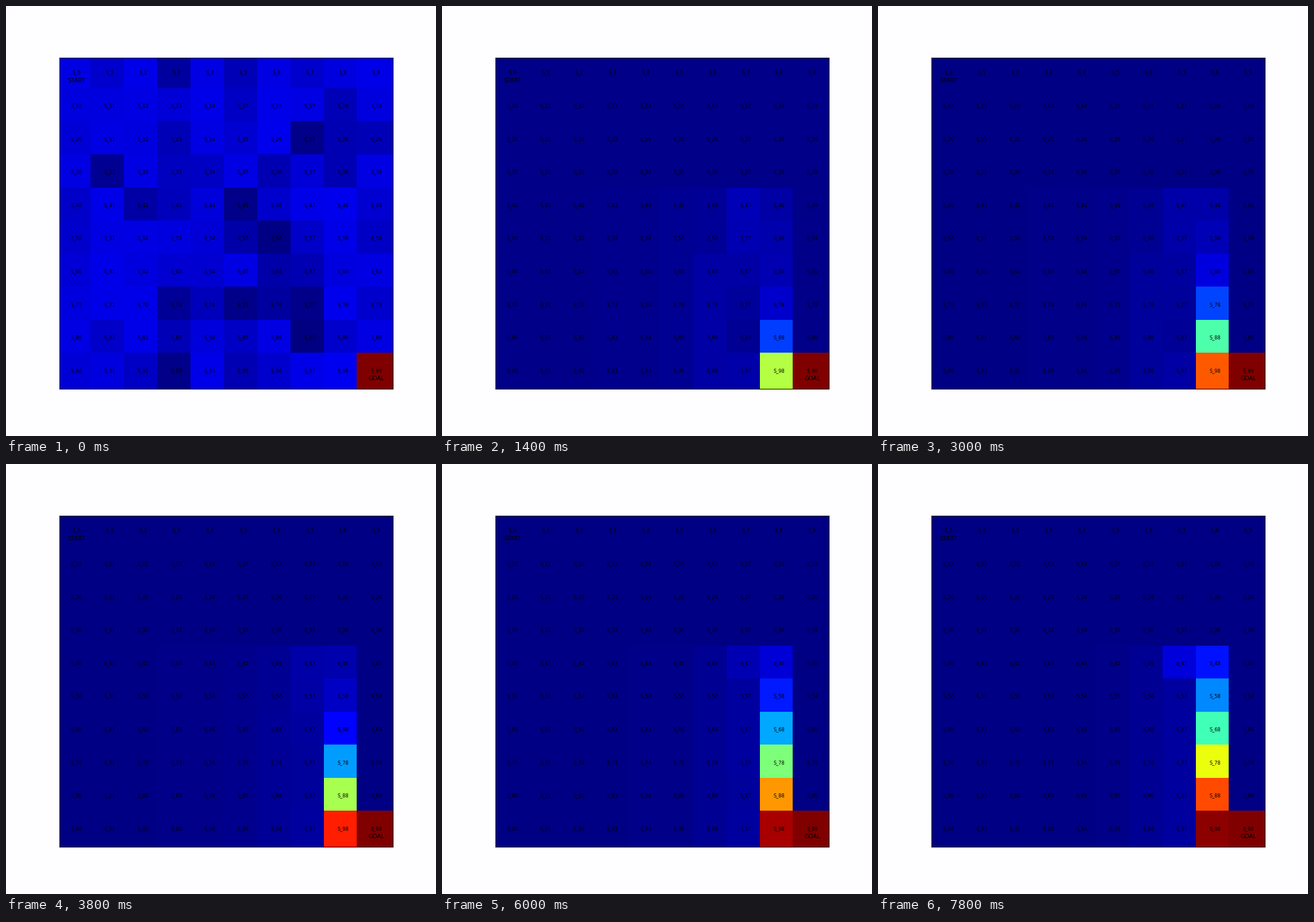
These frames come from a looping animation (748x748 px, 8 s). A matplotlib script:

```python
import numpy as np
import matplotlib.pyplot as plt
from matplotlib.animation import FuncAnimation

SIZE, DPI = 748, 100
STEPS, INTERVAL = 40, 200
N = 10
ALPHA, GAMMA = 0.1, 0.9

# Axes box in pixels, measured from the top left
LEFT, RIGHT, TOP, BOTTOM = 93.4, 673.2, 89.76, 665.72
CELL_W, CELL_H = (RIGHT - LEFT) / N, (BOTTOM - TOP) / N

GOAL = (9, 9)
ROUTE = [(4, 7)] + [(row, 8) for row in range(4, N)] + [GOAL]
DARK_STATES = [27, 31, 45, 56, 73, 75, 77, 87, 93]


def random_values():
    """Untrained values: the best of three small random action values."""
    rng = np.random.default_rng(4)
    v = 0.095 * rng.random((3, N, N)).max(axis=0)
    v.flat[DARK_STATES] = 0.02 * rng.random(len(DARK_STATES))
    v[9, 8] = ALPHA
    v[GOAL] = 1
    return v


def explored_values():
    """After the first long episodes only rarely visited states stay bright."""
    v = np.full((N, N), 0.015)
    v[4:, 3:7] = 0.021
    v[6:, 6] = 0.045
    v[4:6, 7] = 0.058
    v[6:9, 7] = np.linspace(0.036, 0.010, 3)
    v[9, 7] = 0.045
    v[4:9, 8] = np.linspace(0.034, 0.056, 5)
    v[9, 8] = 1 - (1 - ALPHA) ** 3
    v[GOAL] = 1
    return v


def settled_values():
    """Values off the route rise towards it in the lower part of the grid."""
    v = np.full((N, N), 0.005)
    v[4:, :8] += 0.023 * (np.arange(8) / 7) ** 4
    v[GOAL] = 1
    return v


def learn():
    """State values after every episode."""
    first, explored, settled = random_values(), explored_values(), settled_values()
    second = explored + 0.15 * (first - explored)
    second[9, 8] = 1 - (1 - ALPHA) ** 2
    history = [first, second, explored]
    while len(history) < STEPS:
        old = history[-1]
        new = old + ALPHA * (settled - old)
        for here, after in zip(ROUTE, ROUTE[1:]):
            target = 1 if after == GOAL else GAMMA * old[after]
            new[here] = old[here] + ALPHA * (target - old[here])
        history.append(new)
    return history


def edges(offset, step, low, high):
    inner = np.round(offset + step * np.arange(1, N))
    return np.concatenate([[low], inner, [high]])


def label(text, col, row, px):
    ax.text(LEFT + CELL_W * col, TOP + CELL_H * row, text, color="black",
            family="DejaVu Sans", size=px * 72 / DPI, ha="center", va="baseline")


values = learn()

fig = plt.figure(figsize=(SIZE / DPI, SIZE / DPI), dpi=DPI, facecolor="#fefdff")
ax = fig.add_axes([LEFT / SIZE, 1 - BOTTOM / SIZE,
                   (RIGHT - LEFT) / SIZE, (BOTTOM - TOP) / SIZE])
mesh = ax.pcolormesh(edges(89.35, 57.9, LEFT, RIGHT), edges(85.4, 57.55, TOP, BOTTOM),
                     values[0], cmap="jet", vmin=0, vmax=1,
                     antialiased=False, linewidth=0)
ax.set(xlim=(LEFT, RIGHT), ylim=(BOTTOM, TOP), xticks=[], yticks=[])

for n in range(N * N):
    row, col = divmod(n, N)
    label(f"S_{n}", col + 0.5, row + 0.5, 8.3)
label("START", 0.5, 0.75, 10)
label("GOAL", 9.5, 9.75, 10)


def update(step):
    mesh.set_array(values[step])
    return [mesh]


anim = FuncAnimation(fig, update, frames=STEPS, interval=INTERVAL, repeat=True)
plt.show()
```
